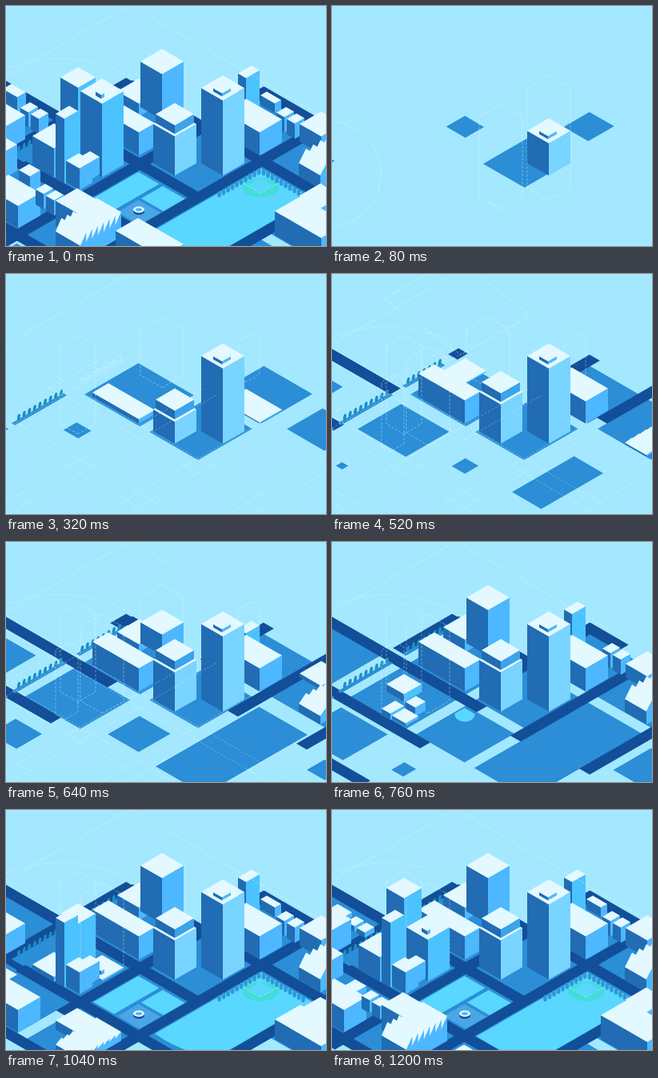
These frames come from a looping animation (400 px wide and 300 px high, 1.24 s). An HTML page with a canvas:

```html
<!DOCTYPE html>
<html lang="en">
<head>
<meta charset="utf-8">
<title>Isometric city</title>
<style>
html, body { margin: 0; width: 100%; height: 100%; overflow: hidden; background: #a4e8ff; }
canvas { display: block; width: 400px; height: 300px; }
</style>
</head>
<body>
<canvas id="stage" width="400" height="300"></canvas>
<script>
const ctx = document.getElementById('stage').getContext('2d');
const LOOP = 1240, K = 0.577;
const SKY = '#a4e8ff', ROOF = '#e3f9ff', LEFT = '#216cb3', RIGHT = '#4db7ff',
  BRIGHT = '#4cc2ff', PALE = '#79d4ff', LOT = '#2b8ed6', ROAD = '#134e99',
  GRASS = '#59d7ff', TREE = '#1b8fc0', BUSH = '#2f98d8';
let T = 0;

const mix = (a, b, p) => a + (b - a) * p;
const prog = (start, end) => Math.max(0, Math.min(1, (T - start) / (end - start)));

function poly(color, ...pts) {
  ctx.beginPath();
  pts.forEach(p => ctx.lineTo(...p));
  ctx.fillStyle = color;
  ctx.fill();
}
function oval(x, y, rx, ry, color, tilt = 0) {
  ctx.beginPath();
  ctx.ellipse(x, y, rx, ry, tilt, 0, 7);
  ctx.fillStyle = color;
  ctx.fill();
}
function dashed(alpha, draw) {
  ctx.save();
  ctx.strokeStyle = `rgba(255,255,255,${alpha})`;
  ctx.lineWidth = 0.7;
  ctx.setLineDash([3, 2]);
  ctx.beginPath();
  draw();
  ctx.stroke();
  ctx.restore();
}
function clipOval(x, y, rx, ry, draw) {
  ctx.save();
  ctx.beginPath();
  ctx.ellipse(x, y, rx, ry, 0, 0, 7);
  ctx.clip();
  draw();
  ctx.restore();
}

// Ground plane: u = y - Kx and v = y + Kx. Streets run along fixed u or v.
const US = [-78, 9, 101, 187, 278, 370], VS = [90, 184, 294, 378, 469, 560];
const iso = (u, v) => [(v - u) / (2 * K), (u + v) / 2];
const rect = (u0, u1, v0, v1, color) =>
  poly(color, iso(u0, v0), iso(u0, v1), iso(u1, v1), iso(u1, v0));

function lot(u0, u1, v0, v1, start) {
  const s = prog(start, start + 330);
  const cu = (u0 + u1) / 2, cv = (v0 + v1) / 2;
  const hu = ((u1 - u0) / 2 - 7) * s, hv = ((v1 - v0) / 2 - 7) * s;
  if (s) rect(cu - hu, cu + hu, cv - hv, cv + hv, LOT);
}
function lots() {
  for (let j = 0; j < 5; j++) {
    for (let i = 0; i < 5; i++) {
      const u = US[i], v = j === 1 ? 200 : VS[j];   // row 1 leaves a tree-lined walk
      const field = j === 3 && i === 1;
      if (u + v < 190 || (j === 3 && i === 2)) continue;
      const home = i === 1 && j === 2;
      const start = home ? -200 : 2.9 * u + 2.1 * Math.abs(v - 190) - 80;
      lot(u, US[field ? i + 2 : i + 1], v, VS[j + 1], start);
    }
  }
}

// Roads all advance at one speed, later the farther from the main crossing
function roadU(u, x0, x1) {
  const x = Math.min(x1, x0 + 0.45 * (T - 327 - 1.83 * Math.abs(u - 101)));
  if (x > x0) rect(u - 7.5, u + 7.5, u + 2 * K * x0, u + 2 * K * x, ROAD);
}
function roadV(v, x0, x1) {
  const x = Math.max(x1, x0 - 0.45 * (T - 364 - 1.2 * Math.abs(v - 378)));
  if (x < x0) rect(v - 2 * K * x0, v - 2 * K * x, v - 7.5, v + 7.5, ROAD);
}
function roads() {
  const [far, back, main, near, front] = US, [, west, mid, east, last] = VS;
  const cross = (u, v) => (v - u) / (2 * K);
  roadV(west, cross(back, west) + 5, -10);
  roadV(mid, cross(far, mid) + 6, -10);
  roadV(east, 408, 90);
  roadV(last, 445, 220);
  roadU(far, cross(far, mid) - 6, 410);
  roadU(back, cross(back, west), 410);
  roadU(main, -8, cross(main, east));
  roadU(near, -8, 210);
  roadU(front, -8, 110);
}

function treeLine() {
  const tip = 0.3 * (T - 57), depth = mix(195.5, 208, prog(780, 920));
  const piece = (x0, x1) => {
    const x = Math.min(x1, tip);
    if (x > x0) rect(193 - 2 * K * x, 193 - 2 * K * x0, 190.5, depth, LOT);
  };
  piece(-10, 1);
  piece(9, 74);
  piece(90, 148);
  for (let x = 16; x < 147; x += 6.6) {
    const y = 188 - x * K;
    if (x > 72 && x < 91) continue;
    if (x < tip) oval(x, y, 1.8, 4, TREE, 0.25);
    else if (T > 120) dashed(0.7, () => ctx.ellipse(x, y, 2, 4, 0.25, 0, 7));
  }
}

function park() {
  const p = prog(740, 890);
  clipOval(166, 215, 90 * p, 70 * p, () => {
    rect(112, 177, 303, 333, GRASS);
    rect(112, 143, 338, 370, GRASS);
    rect(147, 177, 338, 370, '#4aa6e5');
  });
  if (T < 820) return;
  oval(166, 257, 7, 4, ROAD);
  oval(166, 254.5, 7, 4, ROOF);
  oval(166, 254.5, 4, 2, RIGHT);
}

function field() {
  const p = prog(780, 1190);
  clipOval(305, 222, 240 * p, 144 * p, () => rect(19, 179, 387, 461, GRASS));
  if (T < 840) return;
  oval(318, 227, 23, 12, '#43dcdb');
  poly(GRASS, [318, 215], [333, 224], [318, 233], [303, 224]);
  dashed(0.7, () => [[297, 222], [318, 234], [339, 222]].forEach(q => ctx.lineTo(...q)));
  const reach = prog(840, 1000) * 50;
  for (let d = 0; d < reach; d += 5.5) {
    oval(316 - d, 207 + d * K, 2.4, 4, BUSH);
    oval(322 + d, 208 + d * K, 2.4, 4, BUSH);
  }
}

// (x, y) is the nearest ground corner; a and b are the widths to left and right
function block(x, y, a, b, h, right = RIGHT) {
  const t = y - h;
  poly(LEFT, [x, y], [x - a, y - a * K], [x - a, t - a * K], [x, t]);
  poly(right, [x, y], [x + b, y - b * K], [x + b, t - b * K], [x, t]);
  poly(ROOF, [x, t], [x - a, t - a * K], [x - a + b, t - (a + b) * K], [x + b, t - b * K]);
}
function ghost(x, y, a, b, h) {
  const t = y - h;
  dashed(0.55, () => {
    [[x, y], [x - a, y - a * K], [x - a, t - a * K], [x - a + b, t - (a + b) * K],
      [x + b, t - b * K], [x + b, y - b * K], [x, y]].forEach(q => ctx.lineTo(...q));
  });
}
function rise(x, y, h, start, { a = 27, b = 27, dur = 220, right, power = 1 } = {}) {
  const end = start + dur;
  if (h > 40 && T > start - 380 && T < end) ghost(x, y, a, b, h);
  if (T >= start) block(x, y, a, b, h * prog(start, end) ** power, right);
}
function huts(x, y, n, start) {
  for (let i = 0; i < n; i++) rise(x + 13 * i, y + 8 * i, 19, start, { a: 10, b: 12, dur: 60 });
}
function saw(x, y, a, b, h, teeth, start) {
  if (T < start) return;
  const p = prog(start, start + 220), low = h * p, high = (h + 13) * p, w = b / teeth;
  const at = (s, z) => [x + s, y - s * K - z];
  const back = ([px, py]) => [px - a, py - a * K];
  const edge = [at(0, 0)];
  for (let i = teeth - 1; i >= 0; i--) {
    const m = at(i * w, low), n = at((i + 1) * w, high);
    poly(ROOF, m, n, back(n), back(m));
  }
  for (let i = 0; i < teeth; i++) edge.push(at(i * w, low), at((i + 1) * w, high));
  poly(RIGHT, ...edge, at(b, 0));
  poly(LEFT, at(0, 0), at(0, low), back(at(0, low)), back(at(0, 0)));
}

function centre() {
  rise(300, 135, 45, 540, { a: 10, b: 17, right: BRIGHT });
  rise(166, 138, 16, 500);
  rise(195, 142, 57, 540);
  rise(166, 187, 29, 280, { a: 58, b: 20 });
  rise(336, 134, 12, 800, { a: 18, b: 8, dur: 120 });
  huts(348, 158, 2, 680);
  rise(317, 187, 29, 310, { a: 45, b: 28 });
  if (T < 260) {
    ghost(271, 243, 27, 27, 125);
    ghost(211, 254, 27, 27, 100);
  }
  const h = mix(24, 94, prog(40, 290) ** 0.8);
  block(271, 212, 27, 27, h, PALE);
  block(270, 207 - h, 11, 11, 4);
  if (T < 120) return;
  const low = 49 * prog(160, 450);
  block(211, 212, 27, 27, low, PALE);
  block(211, 209 - low, 24, 24, 11, '#3da3ea');
}

function east() {
  rise(394, 185, 22, 590);
  saw(393, 228, 27, 36, 16, 4, 500);
  rise(393, 275, 22, 940);
  rise(394, 320, 30, 860, { a: 58, b: 32 });
}

function west() {
  rise(14, 140, 26, 1190, { a: 18, b: 11, dur: 50 });
  huts(28, 152, 2, 1180);
  rise(-3, 182, 30, 860);
  rise(60, 215, 37, 1000, { dur: 240 });
  rise(90, 200, 98, 680, { a: 22, b: 22, dur: 560, right: BRIGHT, power: 1.2 });
  rise(120, 214, 92, 880, { dur: 360, right: BRIGHT, power: 5 });
  if (T > 1040) block(119, 208 - 92 * prog(880, 1240) ** 5, 7, 4, 5);
  rise(73, 222, 81, 735, { a: 11, b: 17, dur: 280, right: BRIGHT });
  rise(104, 218, 22, 650, { a: 12, b: 13 });
  rise(92, 230, 27, 735, { a: 17, b: 16 });
  rise(0, 214, 36, 1040, { a: 14, b: 14 });
  rise(30, 235, 22, 1180, { a: 14, b: 13, dur: 60 });
}

function south() {
  rise(15, 278, 28, 820, { a: 40, b: 28 });
  huts(47, 254, 2, 1150);
  rise(89, 290, 31, 960);
  saw(93, 318, 31, 51, 18, 7, 960);
  rise(194, 343, 29, 1200, { a: 57, b: 28, dur: 40 });
}

function plan() {
  if (T < 300) dashed(0.6, () => ctx.arc(-5, 210, 66, 0, 7));
  if (T > 240 && T < 720) {
    dashed(0.4, () => {
      for (const d of [-9, 9]) {
        for (const u of US.slice(2)) {
          ctx.moveTo(0, u + d);
          ctx.lineTo(400, u + d + 400 * K);
        }
        for (const v of VS.slice(1)) {
          ctx.moveTo(0, v + d);
          ctx.lineTo(...iso(0, v + d));
        }
      }
    });
  }
  if (T > 260) {
    const far = mix(155, 400, prog(600, 800));
    dashed(0.55, () => {
      ctx.moveTo(0, 88);
      ctx.lineTo(155, -1);
      ctx.lineTo(far, -1 + (far - 155) * K);
    });
  }
  if (T > 440 && T < 600) {
    dashed(0.6, () => [[65, 31], [155, -20], [248, 52], [161, 101], [65, 31]]
      .forEach(q => ctx.lineTo(...q)));
  }
  if (T > 500) dashed(0.4, () => ctx.arc(68, 250, 184, -1.95, -1.1));
}

function draw(now) {
  const t = now % LOOP;
  T = t < 40 ? LOOP : t;   // the finished city holds briefly, then cuts away
  ctx.fillStyle = SKY;
  ctx.fillRect(0, 0, 400, 300);
  [lots, roads, park, field, treeLine, centre, east, west, south, plan].forEach(f => f());
}
const began = performance.now();
function frame() {
  draw(performance.now() - began);
  requestAnimationFrame(frame);
}
frame();
</script>
</body>
</html>
```
